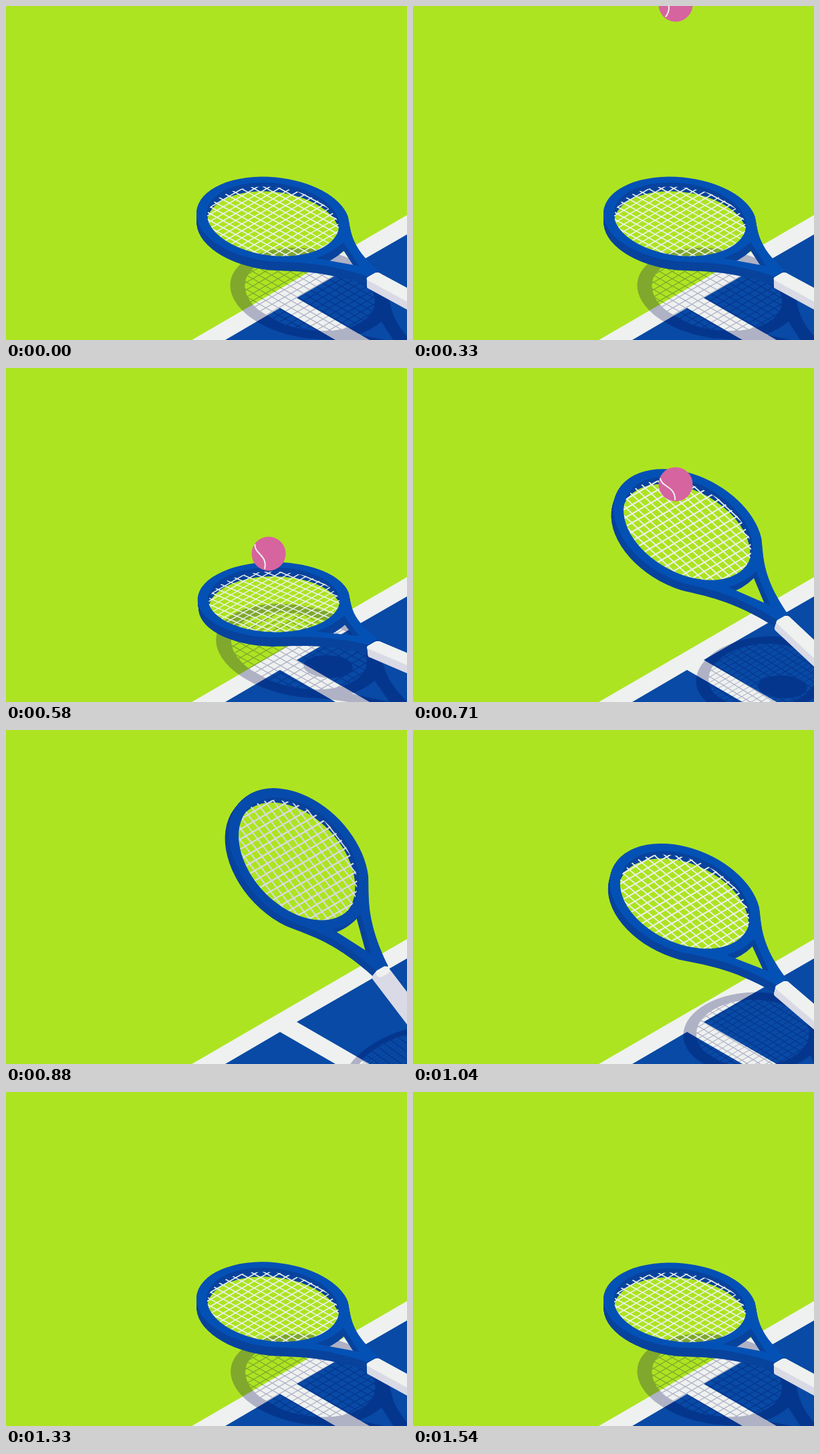
These frames come from a looping animation (600 by 500 pixels, 2.5 s). An HTML page with a canvas:

```html
<!DOCTYPE html>
<html lang="en">
<head>
<meta charset="utf-8">
<title>Tennis racket</title>
<style>
  html, body { margin: 0; overflow: hidden; background: #ade421; }
  canvas { display: block; }
</style>
</head>
<body>
<canvas id="stage" width="600" height="500"></canvas>
<script>
const LOOP = 2500, STEP = 1000 / 24;
const LIME = '#ade421', WHITE = '#eef1ef', COURT = '#084aa5';
const RIM = '#0451b5', RIM_SIDE = '#08439d', GREY = '#d9dae5';
const PINK = '#d6649f', SHADOW = '#000050';
const PIVOT = [629, 450.5], REACH = 265, REST = -1.7;
const LIGHT = [0.68, 1.29];

const stage = document.getElementById('stage');
const ctx = stage.getContext('2d');
const shade = Object.assign(document.createElement('canvas'), { width: 600, height: 500 });
const shadeCtx = shade.getContext('2d');

// Racket tilt in degrees at 24 steps per second
const swing = [[0, REST], [9, REST], [14, -7.5], [19.5, 36], [21, 32.4],
  [25, 13.5], [26, 7.7], [29, -0.8], [33, -1.6], [37, REST], [61, REST]];

const slope = i => (swing[i + 1][1] - swing[i][1]) / (swing[i + 1][0] - swing[i][0]);

function tangent(i) {
  if (i === 0 || i === swing.length - 1) return 0;
  const a = slope(i - 1), b = slope(i);
  return a * b <= 0 ? 0 : 2 * a * b / (a + b);
}

function tiltAt(f) {
  const i = swing.findIndex((k, n) => f < swing[n + 1][0]);
  const [f0, a] = swing[i], [f1, b] = swing[i + 1];
  const d = f1 - f0, t = (f - f0) / d, s = t * t * (3 - 2 * t);
  return a + (b - a) * s + d * t * (1 - t) * ((1 - t) * tangent(i) - t * tangent(i + 1));
}

function ballAt(f) {
  const n = f - 8;
  return f < 15 ? -2 + 40 * n + 1.11 * n * n : 330 - 78 * (f - 15);
}

const mix = (a, b, part) => `color-mix(in srgb, ${a} ${100 * part}%, ${b})`;

// Racket paths: x runs from the head centre to the tip, y across the head
const hoop = new Path2D();
hoop.ellipse(0, 0, 88, 73, 0, 0, 7);

const frame = new Path2D();
frame.ellipse(0, 0, 101, 85.5, 0, -2.231, 2.231);
frame.bezierCurveTo(-86, 49, -108, 24, -172, 9);
frame.lineTo(-172, -9);
frame.bezierCurveTo(-108, -24, -86, -49, -62, -67.5);
frame.closePath();
frame.moveTo(88, 0);
frame.ellipse(0, 0, 88, 73, 0, 0, 2 * Math.PI);
frame.moveTo(-98, 24);
frame.quadraticCurveTo(-104, 0, -98, -24);
frame.lineTo(-149, 0);
frame.closePath();

const strings = new Path2D();
for (let k = -81; k <= 81; k += 10.8) {
  strings.moveTo(-90, k);
  strings.lineTo(90, k);
  strings.moveTo(k, -75);
  strings.lineTo(k, 75);
}

const grip = new Path2D();
grip.roundRect(-330, -10, 161, 21, 5);
const cap = new Path2D();
cap.roundRect(-179, -10, 10, 21, 5);

function drawStrings(c, color, width) {
  c.save();
  c.clip(hoop);
  c.strokeStyle = color;
  c.lineWidth = width;
  c.stroke(strings);
  c.restore();
}

function polygon(color, ...points) {
  ctx.fillStyle = color;
  ctx.beginPath();
  for (const [x, y] of points) ctx.lineTo(x, y);
  ctx.fill();
}

function drawCourt() {
  polygon(LIME, [0, 0], [600, 0], [600, 500], [0, 500]);
  polygon(WHITE, [278, 500], [600, 313], [600, 500]);
  polygon(COURT, [328, 500], [410, 452], [493, 500]);
  polygon(COURT, [435, 437], [600, 342], [600, 500], [544, 500]);
}

function drawShadows(sin, cos, x, y, ballY) {
  const c = shadeCtx, [lx, ly] = LIGHT;
  const height = 81 + REACH * (sin - Math.sin(REST * Math.PI / 180));
  c.resetTransform();
  c.clearRect(0, 0, 600, 500);
  c.fillStyle = c.strokeStyle = SHADOW;
  const drop = 409 - ballY;
  c.beginPath();
  c.ellipse(393 + lx * drop, ballY + ly * drop, 37, 17, 0.05, 0, 7);
  c.fill();
  c.setTransform(-0.866 * cos + lx * sin, -0.5 * cos + (ly - 1) * sin, 0.866, -0.5,
    x + lx * height, y + ly * height);
  c.fill(frame, 'evenodd');
  c.lineWidth = 5;
  c.stroke(frame);
  c.fill(grip);
  drawStrings(c, SHADOW, 1.5);
  ctx.globalAlpha = 0.26;
  ctx.drawImage(shade, 0, 0);
  ctx.globalAlpha = 1;
}

function drawRacket(tilt, sin, cos, ux, uy, x, y) {
  const lit = Math.max(0, Math.min(1, (30 - tilt) / 10));
  const layer = z => ctx.setTransform(ux, uy, 0.866, -0.5,
    x + z * 0.866 * sin, y + z * (0.5 * sin - cos));
  for (let z = -6.5; z <= 6.5; z++) {
    layer(z);
    if (z === 0.5) drawStrings(ctx, mix(WHITE, GREY, lit), 1.9);
    ctx.fillStyle = z === 6.5 ? mix(RIM, RIM_SIDE, 0.6 + 0.4 * lit) : RIM_SIDE;
    ctx.fill(frame, 'evenodd');
  }
  ctx.fillStyle = GREY;
  for (let z = -10; z <= 2; z++) {
    layer(z);
    ctx.fill(grip);
  }
  ctx.fillStyle = mix(WHITE, GREY, lit);
  ctx.fill(grip);
  ctx.fillStyle = WHITE;
  ctx.fill(cap);
  ctx.resetTransform();
}

function drawBall(y, spin) {
  ctx.save();
  ctx.translate(393, y);
  ctx.rotate(spin);
  ctx.fillStyle = PINK;
  ctx.beginPath();
  ctx.arc(0, 0, 25.5, 0, 7);
  ctx.fill();
  ctx.strokeStyle = WHITE;
  ctx.lineWidth = 2;
  ctx.beginPath();
  ctx.moveTo(-20.5, -14);
  ctx.bezierCurveTo(-22, 0, -1, 2, -6, 23);
  ctx.stroke();
  ctx.restore();
}

function draw(now) {
  const f = Math.floor((now % LOOP + 4) / STEP);
  const tilt = tiltAt(f), angle = tilt * Math.PI / 180;
  const sin = Math.sin(angle), cos = Math.cos(angle);
  const ux = -0.866 * cos, uy = -0.5 * cos - sin;
  const x = PIVOT[0] + REACH * ux, y = PIVOT[1] + REACH * uy;
  const ballY = ballAt(f);
  drawCourt();
  drawShadows(sin, cos, x, y, ballY);
  drawRacket(tilt, sin, cos, ux, uy, x, y);
  drawBall(ballY, (14 - f) * 0.073);
}

const start = performance.now();
function tick() {
  draw((performance.now() - start) % LOOP);
  requestAnimationFrame(tick);
}
tick();
</script>
</body>
</html>
```
